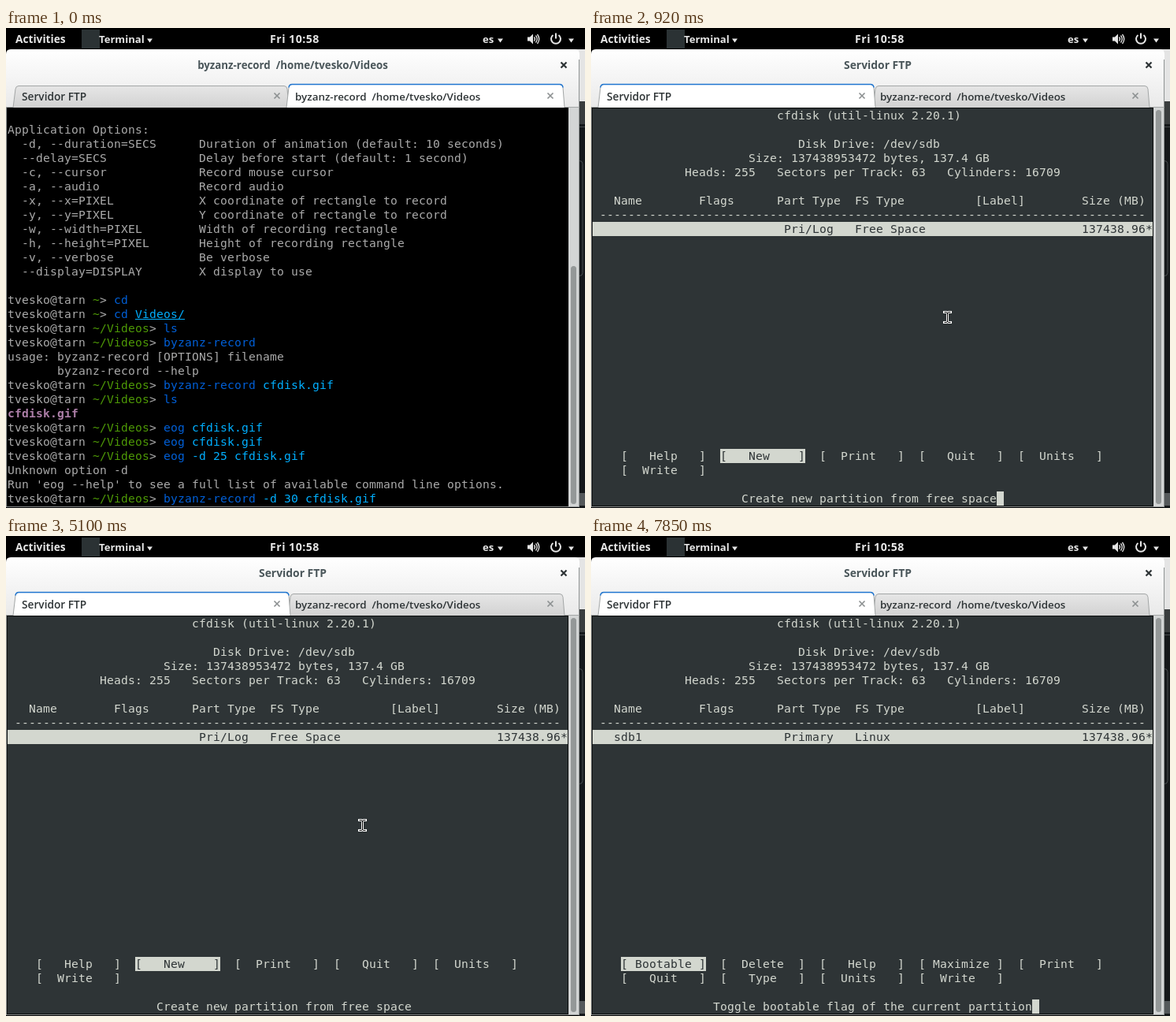
Write an HTML page that moves like this. It is 735x609 px and loops after 8000 ms.

```html
<!DOCTYPE html>
<html lang="en">
<head>
<meta charset="utf-8">
<title>Terminal session</title>
<style>
html, body { margin: 0; width: 100%; height: 100%; overflow: hidden; background: #000; }
#stage { position: absolute; left: 0; top: 0; width: 735px; height: 609px; overflow: hidden; }
svg { position: absolute; left: 0; top: 0; }
svg text { font-family: "Open Sans", "Noto Sans", sans-serif; font-weight: 600; white-space: pre; }
svg .bold text, svg #title { font-weight: 700; }
#term { position: absolute; left: 1px; top: 101px; width: 713px; height: 506px; overflow: hidden; background: #000; }
#term.disk { background: #2e3436; box-shadow: inset 0 0 0 1px #0b0d0d; }
.scene { position: absolute; left: 1px; top: 1px; display: none; }
.scene.on { display: block; }
.cell, #cursor {
  position: absolute; height: 18px; white-space: pre;
  font: 14.667px/17px "DejaVu Sans Mono", monospace;
}
.shell { color: #aaa; }
.disk .cell { color: #d3d7cf; }
.disk .inv, #cursor { background: #d3d7cf; color: #2e3436; }
#cursor { width: 9px; }
.shell .path { color: #4e9a06; }
.shell .cmd { color: #005fd7; }
.shell .arg { color: #00afff; }
.shell .link { color: #00afff; text-decoration: underline; }
.shell .file { color: #ad7fa8; font-weight: bold; }
</style>
</head>
<body>
<div id="stage">
  <svg width="735" height="609">
    <defs>
      <linearGradient id="head" x2="0" y2="1"><stop stop-color="#fff"/><stop offset="1" stop-color="#e9e9e9"/></linearGradient>
      <linearGradient id="idle" x2="0" y2="1"><stop stop-color="#e6e6e6"/><stop offset="1" stop-color="#d2d2d2"/></linearGradient>
      <clipPath id="above"><path d="M0 60h735v23H0z"/></clipPath>
      <clipPath id="below"><path d="M0 83h735v19H0z"/></clipPath>
    </defs>

    <!-- desktop behind the window -->
    <path fill="#e4e4e4" d="M720 27h15v66h-15z"/>
    <path fill="#3a3d3e" d="M727 93h8v29h-8z"/>
    <path fill="#15181a" d="M727 122h8v487h-8z"/>
    <path fill="none" stroke="#484c4e" d="M728 168.500q4 0 4 4v138q0 4-4 4M728 125.500h7"/>
    <path fill="#55595b" d="M728 590h7v16h-7z"/>

    <!-- top bar -->
    <path d="M0 0h735v27H0z"/>
    <path fill="#2b3234" d="M96 2h23v24H96z"/>
    <g class="bold" fill="#e6e6e6">
      <text x="12" y="19" font-size="13.700">Activities</text>
      <text x="118" y="19" font-size="13.100">Terminal</text>
      <text x="335" y="19" font-size="14.100" letter-spacing=".5">Fri 10:58</text>
      <text x="605" y="19" font-size="13.100">es</text>
      <path d="M179 13.500h7l-3.500 5zM624 13.500h7l-3.500 5zM714 13.500h7l-3.500 5z"/>
      <path d="M662 11.500h3l4-4v13l-4-4h-3z"/>
    </g>
    <g fill="none" stroke="#e6e6e6">
      <path stroke-width="1.300" d="M670.500 11.500q2 2.500 0 5M672.500 9.500q3.500 4.500 0 9M674.500 8q4.500 6 0 12"/>
      <path stroke-width="2" d="M694.500 9a6 6 0 1 0 7 0M698 6.500v7"/>
    </g>

    <!-- window frame -->
    <path fill="#d3d5d5" d="M0 60h728v548H0z"/>
    <path fill="url(#head)" d="M0 101V33q0-6 6-6h716q6 0 6 6v68z"/>
    <path fill="none" stroke="#8f9393" d="M.5 101v507M727.500 40v568M0 607.500h728"/>
    <text id="title" x="364" y="52" text-anchor="middle" fill="#4a565a"></text>
    <path stroke="#2e3436" stroke-width="2.200" d="M704.500 43.500l7 7m0-7l-7 7"/>
    <g id="tabs"></g>
    <g fill="#2e3436" font-size="13.400">
      <text x="20" y="92" font-size="13.700">Servidor FTP</text>
      <text x="367" y="92">byzanz-record  /home/tvesko/Videos</text>
    </g>
    <path stroke="#8d9192" stroke-width="1.700" d="M340.500 82.500l7 7m0-7l-7 7M687.500 82.500l7 7m0-7l-7 7"/>
    <rect id="bar" x="717" width="7" rx="3.500" fill="#949898"/>
  </svg>

  <div id="term"><div id="cursor"></div></div>

  <svg id="mouse" width="735" height="609" fill="none">
    <path stroke="#fff" stroke-width="3" stroke-linecap="square" d="M448.500 360.500h2.500l1.500 1 1.500-1h2.500M452.500 361v12M448.500 373.500h2.500l1.500-1 1.500 1h2.500"/>
    <path stroke="#000" d="M448.500 360.500h2.500l1.500 1 1.500-1h2.500M452.500 361v12M448.500 373.500h2.500l1.500-1 1.500 1h2.500"/>
  </svg>
</div>

<script>
const $ = id => document.getElementById(id);
const COL = 9, ROW = 18, LOOP = 8000;
const HOST = 'tvesko@tarn ';
const term = $('term'), cursor = $('cursor');

// Letter spacing that puts the mono font on the column grid.
function gridSpacing() {
  const probe = document.createElement('span');
  probe.className = 'cell';
  probe.textContent = '0'.repeat(100);
  term.append(probe);
  const advance = probe.getBoundingClientRect().width / 100;
  probe.remove();
  return COL - advance + 'px';
}
term.style.letterSpacing = gridSpacing();

function scene(id, kind) {
  const el = document.createElement('div');
  el.id = id;
  el.className = 'scene ' + kind;
  term.insertBefore(el, cursor);
  // Place text at a column and row; returns the next column.
  return (col, row, text, cls = '') => {
    const cell = document.createElement('span');
    cell.className = 'cell ' + cls;
    cell.textContent = text;
    cell.style.left = col * COL + 'px';
    cell.style.top = row * ROW + 'px';
    el.append(cell);
    return col + text.length;
  };
}

function buildShell(id, top) {
  const put = scene(id, 'shell');
  const options = [
    ['-d, --duration=SECS', 'Duration of animation (default: 10 seconds)'],
    ['--delay=SECS', 'Delay before start (default: 1 second)'],
    ['-c, --cursor', 'Record mouse cursor'],
    ['-a, --audio', 'Record audio'],
    ['-x, --x=PIXEL', 'X coordinate of rectangle to record'],
    ['-y, --y=PIXEL', 'Y coordinate of rectangle to record'],
    ['-w, --width=PIXEL', 'Width of recording rectangle'],
    ['-h, --height=PIXEL', 'Height of recording rectangle'],
    ['-v, --verbose', 'Be verbose'],
    ['--display=DISPLAY', 'X display to use']
  ];
  let row = top;
  const say = (text, cls) => put(0, row++, text, cls);
  const run = (dir, cmd, arg = '', cls = 'arg') => {
    let col = put(0, row, HOST);
    col = put(col, row, dir, 'path');
    col = put(col, row, '> ');
    col = put(col, row, cmd, 'cmd');
    if (arg) put(col + 1, row, arg, cls);
    row++;
  };
  const vid = '~/Videos';

  say('Application Options:');
  for (const [flag, text] of options) {
    put(2, row, flag);
    put(27, row++, text);
  }
  row++;
  run('~', 'cd');
  run('~', 'cd', 'Videos/', 'link');
  run(vid, 'ls');
  run(vid, 'byzanz-record');
  say('usage: byzanz-record [OPTIONS] filename');
  say('       byzanz-record --help');
  run(vid, 'byzanz-record', 'cfdisk.gif');
  run(vid, 'ls');
  say('cfdisk.gif', 'file');
  run(vid, 'eog', 'cfdisk.gif');
  run(vid, 'eog', 'cfdisk.gif');
  run(vid, 'eog', '-d 25 cfdisk.gif');
  say('Unknown option -d');
  say("Run 'eog --help' to see a full list of available command line options.");
  run(vid, 'byzanz-record', '-d 30 cfdisk.gif');
}

// menu: [column, row, label]; active: index of the highlighted entry
function buildDisk(id, part, menu, active, hint, hintCol) {
  const put = scene(id, 'disk');
  put(26, 0, 'cfdisk (util-linux 2.20.1)');
  put(29, 2, 'Disk Drive: /dev/sdb');
  put(22, 3, 'Size: 137438953472 bytes, 137.4 GB');
  put(13, 4, 'Heads: 255   Sectors per Track: 63   Cylinders: 16709');
  [[3, 'Name'], [15, 'Flags'], [26, 'Part Type'], [37, 'FS Type'], [54, '[Label]'], [69, 'Size (MB)']]
    .forEach(([col, text]) => put(col, 6, text));
  put(1, 7, '-'.repeat(77));
  const [name, type, fs] = part;
  put(0, 8, ('   ' + name).padEnd(27) + type.padEnd(10) + fs.padEnd(32) + '137438.96*', 'inv');
  menu.forEach(([col, row, text], i) => put(col, row, text, i === active ? 'inv' : ''));
  put(hintCol, 27, hint);
}

const grid = labels => labels.map((s, i) => {
  const pad = Math.floor((10 - s.length) / 2);
  return [4 + 14 * (i % 5), 24 + Math.floor(i / 5), '[' + (' '.repeat(pad) + s).padEnd(10) + ']'];
});
const free = ['', 'Pri/Log', 'Free Space'];

buildShell('typed', 1);
buildShell('sent', 0);
buildDisk('main', free, grid(['Help', 'New', 'Print', 'Quit', 'Units', 'Write']), 1,
  'Create new partition from free space', 21);
buildDisk('kind', free, [[4, 24, '[Primary]'], [15, 24, '[Logical]'], [26, 24, '[Cancel ]']], 0,
  'Create a new primary partition', 24);
buildDisk('size', free, [[4, 24, 'Size (in MB): 137438.95']], -1, '', 0);
buildDisk('done', ['sdb1', 'Primary', 'Linux'],
  grid(['Bootable', 'Delete', 'Help', 'Maximize', 'Print', 'Quit', 'Type', 'Units', 'Write']), 0,
  'Toggle bootable flag of the current partition', 17);

function tab(x, right, lit) {
  const y = lit ? 71.5 : 73.5;
  const edge = `${x + 3} ${y + 4}Q${x + 3.5} ${y} ${x + 7} ${y}H${right - 6}Q${right - 2.5} ${y} ${right - 2} ${y + 4}`;
  const fill = lit ? '#fff' : 'url(#idle)';
  const line = lit ? `<path fill="none" stroke="#1f75d0" stroke-width="1.6" d="M${edge}"/>` : '';
  return `<path fill="${fill}" stroke="#a3a6a6" d="M${x} 101L${edge}L${right} 101"/>` + line;
}
const rule = '<path stroke="#a3a6a6" d="M0 100.5h9M709 100.5h19"/>';
const clip = (id, content) => `<g clip-path="url(#${id})">${content}</g>`;
const tabs = {
  second: tab(9, 359, false) + tab(356, 709, true) + rule,
  first: tab(358, 709, false) + tab(9, 361, true) + rule
};
// The tab bar repaints from the top down.
tabs.torn = clip('above', tabs.first) + clip('below', tabs.second);

// time, scene, cursor [column, row, character], tab state, title, mouse shown
const HOME = 'byzanz-record  /home/tvesko/Videos', FTP = 'Servidor FTP';
const main = [57, 27], kind = [54, 27], size = [18, 24, '1'];
const steps = [
  [0, 'typed', null, 'second', HOME, 0],
  [40, 'sent', [0, 27], 'second', HOME, 0],
  [560, 'sent', null, 'second', HOME, 0],
  [830, 'sent', null, 'second', FTP, 1],
  [880, 'sent', null, 'torn', FTP, 1],
  [920, 'main', main, 'first', FTP, 1],
  [1450, 'main', null, 'first', FTP, 1],
  [2100, 'main', main, 'first', FTP, 1],
  [2710, 'main', null, 'first', FTP, 1],
  [3280, 'main', main, 'first', FTP, 1],
  [3890, 'main', null, 'first', FTP, 1],
  [4500, 'main', main, 'first', FTP, 1],
  [5100, 'main', null, 'first', FTP, 1],
  [5250, 'main', null, 'first', FTP, 0],
  [5370, 'kind', kind, 'first', FTP, 0],
  [5940, 'kind', null, 'first', FTP, 0],
  [6560, 'size', size, 'first', FTP, 0],
  [7120, 'size', null, 'first', FTP, 0],
  [7700, 'size', size, 'first', FTP, 0],
  [7850, 'done', [62, 27], 'first', FTP, 0]
];

let shown = null;
function show(step) {
  if (step === shown) return;
  shown = step;
  const [, id, cur, tabState, title, mouse] = step;
  document.querySelectorAll('.scene').forEach(el => el.classList.toggle('on', el.id === id));
  const shell = $(id).classList.contains('shell');
  term.className = shell ? '' : 'disk';
  cursor.style.display = cur ? 'block' : 'none';
  if (cur) {
    cursor.style.left = 1 + cur[0] * COL + 'px';
    cursor.style.top = 1 + cur[1] * ROW + 'px';
    cursor.textContent = cur[2] || '';
  }
  $('title').textContent = title;
  $('title').setAttribute('font-size', title === HOME ? 13.3 : 13.9);
  $('tabs').innerHTML = tabs[tabState];
  const top = shell ? 302 : 104;
  $('bar').setAttribute('y', top);
  $('bar').setAttribute('height', 604 - top);
  $('mouse').style.display = mouse ? 'block' : 'none';
}

const start = performance.now();
function tick() {
  const t = (performance.now() - start) % LOOP;
  show(steps.findLast(s => s[0] <= t));
  requestAnimationFrame(tick);
}
tick();
</script>
</body>
</html>
```
